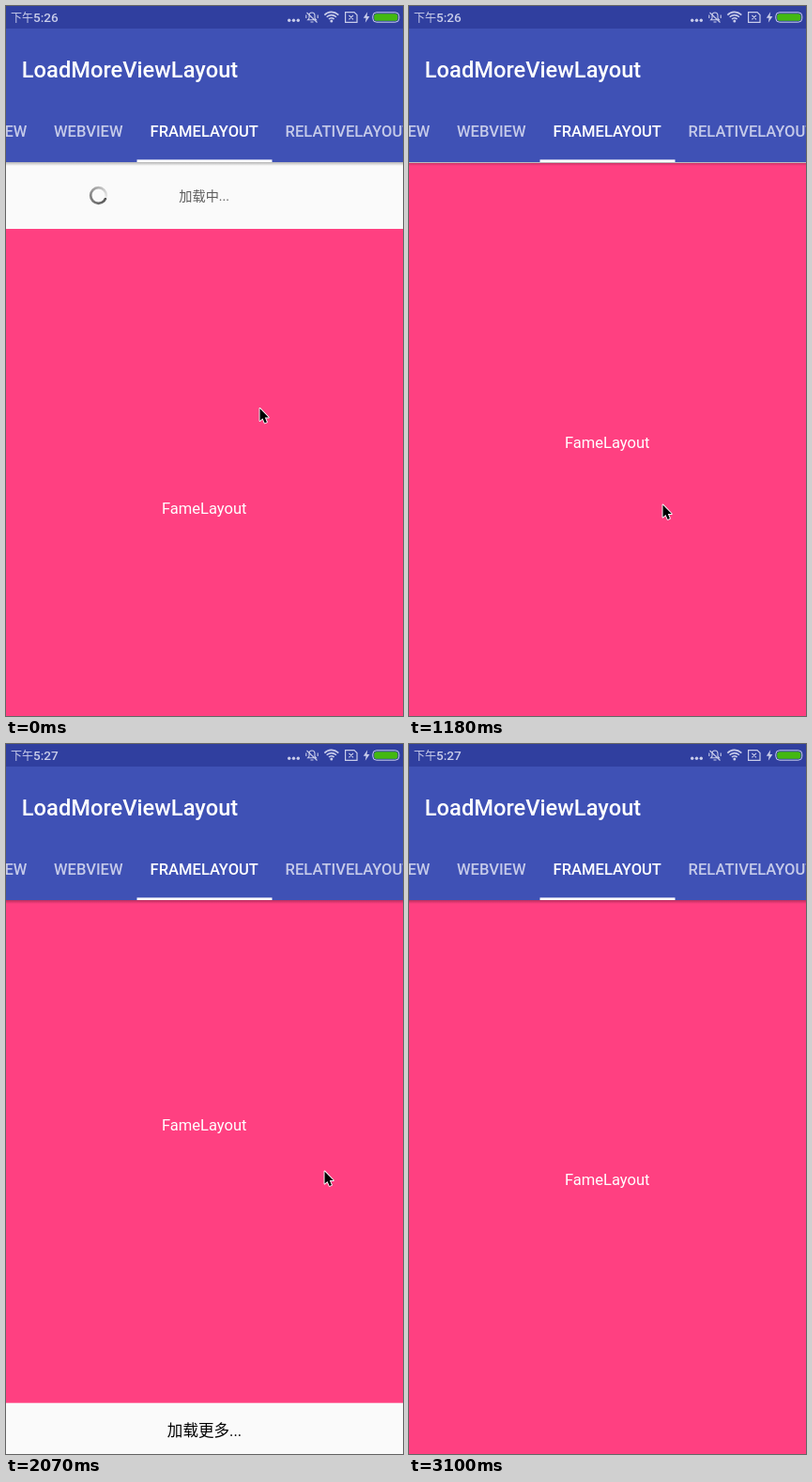
These frames come from a looping animation (423 by 755 pixels, 3.4 s). An HTML page with a canvas:

```html
<!DOCTYPE html>
<html lang="zh-CN">
<head>
<meta charset="utf-8">
<style>
html, body { margin: 0; width: 100%; height: 100%; overflow: hidden; background: #ff4081; }
canvas { display: block; width: 423px; height: 755px; }
</style>
</head>
<body>
<canvas id="stage" width="423" height="755"></canvas>
<script>
const ctx = document.getElementById('stage').getContext('2d');
const W = 423, H = 755, LOOP = 3400;
const BEAT = 147.8;              // the screen refreshes once per beat
const BAR = 166;                 // bottom edge of the app bar
const HEADER = 71, FOOTER = 58;  // resting offsets while loading
const PULL = 95;                 // furthest upward drag
const SP = 1.183;                // pixels per text unit
const FONT = 'Roboto, "Noto Sans CJK SC", "Noto Sans CJK", sans-serif';

const linear = u => u;
const smooth = u => (1 - Math.cos(Math.PI * u)) / 2;
const power = p => u => u ** p;
const settle = p => u => 1 - (1 - u) ** p;

// Applies successive moves, each [start beat, end beat, goal, easing].
function glide(beat, value, ...moves) {
  for (const [start, end, goal, ease = linear] of moves) {
    const u = Math.min(1, Math.max(0, (beat - start) / (end - start)));
    value += (goal - value) * ease(u);
  }
  return value;
}

const drag = power(0.8);

const pageOffset = beat => glide(beat, HEADER,
  [3.8, 7.5, 1, smooth],
  [8, 10, -PULL, drag],
  [10, 12, -FOOTER, settle(1.45)],
  [19, 20.16, 0, smooth]);

function pointerAt(beat) {
  const swing = glide(beat, 0, [1.8, 7, 1]);
  const bulge = 11.5 * Math.sin(Math.PI * swing ** 0.7);
  return [
    glide(beat, 270.5, [8, 10, 290.5, drag], [11, 13, 339.5], [14, 16, 366, power(1.6)]) + bulge,
    glide(beat, 428, [2, 7, 535], [7, 8, 530.5], [8, 10, 333.5, drag],
      [11, 13, 454.5], [14, 16, 737, settle(1.6)])
  ];
}

function rect(x, y, w, h, color) {
  ctx.fillStyle = color;
  ctx.fillRect(x, y, w, h);
}

function text(str, x, y, size, color, align = 'left', weight = 400) {
  ctx.font = `${weight} ${size * SP}px ${FONT}`;
  ctx.textAlign = align;
  ctx.fillStyle = color;
  ctx.fillText(str, x, y);
}

function dot(x, y, r) {
  ctx.beginPath();
  ctx.arc(x, y, r, 0, Math.PI * 2);
  ctx.fill();
}

const poly = d => new Path2D(d);

function spinner(x, y, angle) {
  const shade = ctx.createConicGradient(angle, x, y);
  shade.addColorStop(0, '#555');
  shade.addColorStop(0.5, '#8c8c8c');
  shade.addColorStop(1, '#eee');
  ctx.strokeStyle = shade;
  ctx.lineWidth = 2.7;
  ctx.beginPath();
  ctx.arc(x, y, 8.3, 0, Math.PI * 2);
  ctx.stroke();
}

function header(beat, offset) {
  const loading = beat < 5;
  rect(0, BAR, W, offset, '#fafafa');
  if (loading) spinner(98.5, 130.5 + offset, 0.35 + beat * BEAT / 1000 * Math.PI * 2);
  text(loading ? '加载中...' : '加载成功', 211.2, 136 + offset, 12, '#5c5c5c', 'center');
}

function footer(beat, offset) {
  const label = beat < 10 ? '上拉加载' : beat < 11 ? '松开加载'
    : beat < 17 ? '加载更多...' : '加载成功';
  rect(0, 758.7 + offset, W, H, '#fafafa');
  text(label, 211.5, 794.2 + offset, 14, '#000', 'center');
}

function statusIcons() {
  ctx.fillStyle = ctx.strokeStyle = '#c9cdea';
  for (let i = 0; i < 3; i++) dot(301.7 + i * 4.8, 15.3, 1.7);

  // Muted bell
  ctx.lineWidth = 1.1;
  ctx.stroke(poly('M321.5 14.8L323 13V10C323 6 329 6 329 10V13L330.5 14.8Z'
    + 'M324.5 17H327.5M320.5 7L331.5 17.5M319.8 9.5V13M332.2 9.5V13'));

  // Wi-Fi
  ctx.lineWidth = 1.6;
  for (let r = 3.8; r < 11; r += 3.2) {
    ctx.beginPath();
    ctx.arc(346.8, 16.6, r, -Math.PI * 0.76, -Math.PI * 0.24);
    ctx.stroke();
  }
  dot(346.8, 16, 1.5);

  // Missing SIM
  ctx.lineWidth = 1.2;
  ctx.stroke(poly('M361.6 6.6H371L374 9.5V17.4H361.6ZM365.4 9.8l4.6 4.6m0-4.6l-4.6 4.6'));

  // Charging battery
  ctx.fill(poly('M385.2 6.3L380.8 12.8H383.6L382.8 17.8L387.4 11H384.5Z'));
  ctx.lineWidth = 1;
  ctx.beginPath();
  ctx.roundRect(390.8, 6.8, 28, 10.4, 4);
  ctx.stroke();
  ctx.fillStyle = '#43b811';
  ctx.beginPath();
  ctx.roundRect(392.2, 8.2, 25.2, 7.6, 2.8);
  ctx.fill();
}

function appBar(beat) {
  const shadow = ctx.createLinearGradient(0, BAR, 0, BAR + 4);
  shadow.addColorStop(0, 'rgba(0,0,0,.28)');
  shadow.addColorStop(1, 'rgba(0,0,0,0)');
  rect(0, BAR, W, 4, shadow);
  rect(0, 0, W, BAR, '#3f51b5');
  rect(0, 0, W, 24, '#303f9f');

  text('下午', 5, 16.6, 10.2, '#c9cdea', 'left', 500);
  text(beat < 13 ? '5:26' : '5:27', 29, 16.8, 11.5, '#c9cdea', 'left', 500);
  statusIcons();

  text('LoadMoreViewLayout', 16.8, 75.6, 20, '#fff', 'left', 500);
  const tab = (str, x, color, align) => text(str, x, 139, 14, color, align, 500);
  const faded = '#c5cae9';
  tab('VIEW', 22.4, faded, 'right');
  tab('WEBVIEW', 51, faded);
  tab('FRAMELAYOUT', 153.6, '#fff');
  tab('RELATIVELAYOUT', 297.6, faded);
  rect(139.5, 163.4, 144, 2.6, '#fff');
}

function pointer(x, y) {
  const arrow = poly('M0 0V13L3 10.4L5.2 15.4L7.4 14.4L5.3 9.6H9.3Z');
  ctx.save();
  ctx.translate(x, y);
  ctx.lineJoin = 'round';
  ctx.lineWidth = 1.8;
  ctx.strokeStyle = '#fff';
  ctx.stroke(arrow);
  ctx.fillStyle = '#000';
  ctx.fill(arrow);
  ctx.restore();
}

function draw(now) {
  const beat = Math.floor((now % LOOP) / BEAT + 0.04);
  const offset = pageOffset(beat);

  rect(0, 0, W, H, '#ff4081');
  if (offset > 0) header(beat, offset);
  if (offset < 0) footer(beat, offset);
  text('FameLayout', 211.2, 469 + offset, 14, '#fff', 'center');
  appBar(beat);
  if (beat < 17) pointer(...pointerAt(beat));
}

const start = performance.now();
function tick() {
  draw(performance.now() - start);
  requestAnimationFrame(tick);
}
tick();
</script>
</body>
</html>
```
